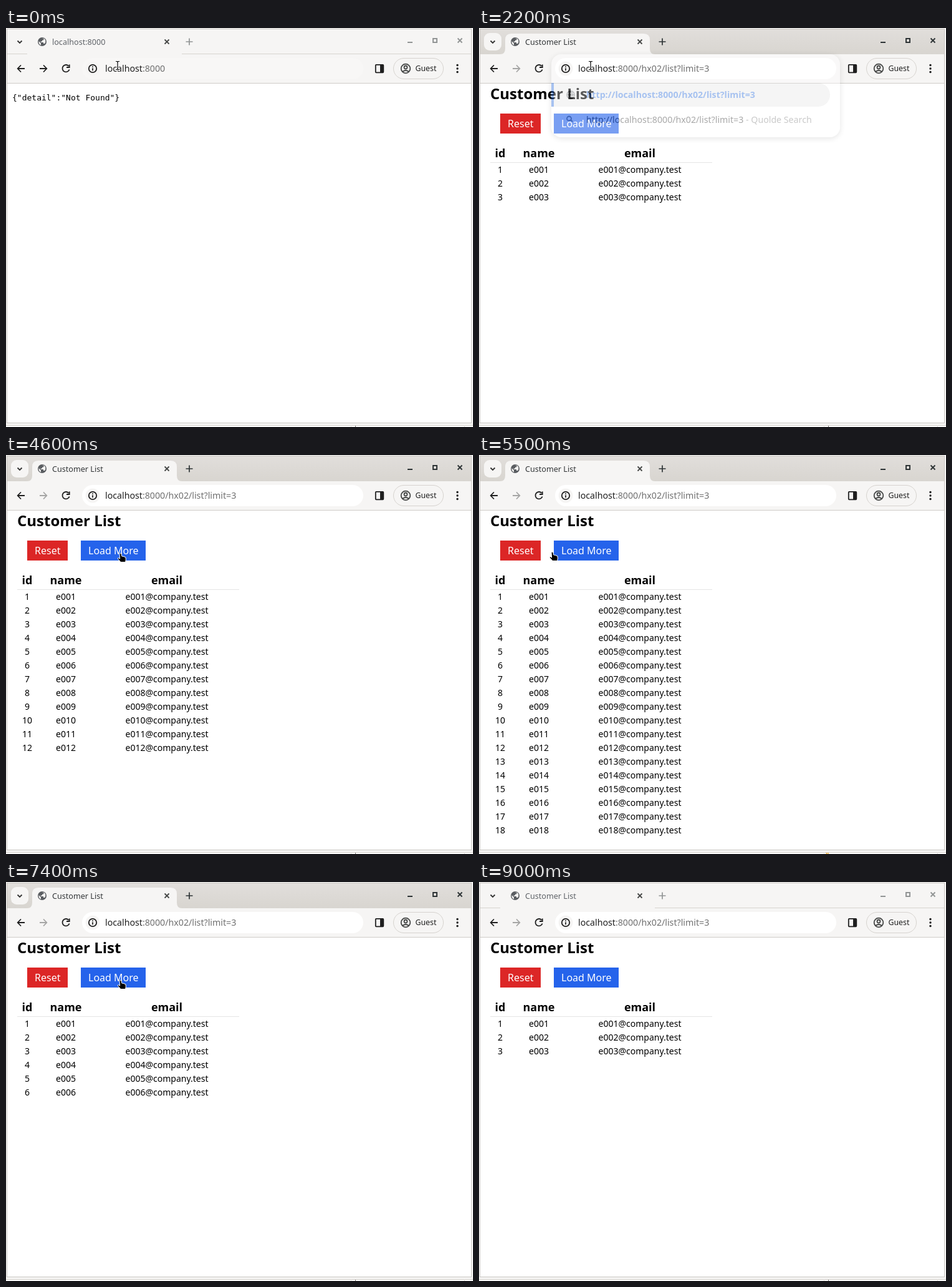
Write an HTML page that moves like this. It is 749 px wide and 639 px high and loops after 9.3 s.

```html
<!DOCTYPE html>
<html lang="en">
<head>
<meta charset="utf-8">
<title>Customer List</title>
<style>
html, body { margin: 0; width: 100%; height: 100%; overflow: hidden; background: #f9f8f7; }
svg { display: block; width: 749px; height: 639px; }
text { font-family: "Noto Sans", sans-serif; white-space: pre; }
.mono { font: 13px "DejaVu Sans Mono", monospace; }
.url { font-size: 14.2px; }
.tab { font-size: 12.6px; }
.small { font-size: 12.3px; }
.btn { font-size: 16px; fill: #fff; }
.head { font-size: 18px; font-weight: 700; text-anchor: middle; }
.cell { font-size: 14px; text-anchor: middle; }
.line { fill: none; stroke-width: 1.8; }
#card { filter: drop-shadow(0 2px 5px rgba(0,0,0,.28)); }
#cursor path { stroke-linejoin: round; }
</style>
</head>
<body>
<svg viewBox="0 0 749 639" xmlns="http://www.w3.org/2000/svg">
  <defs>
    <linearGradient id="strip" x1="0" y1="0" x2="0" y2="1">
      <stop offset="0" stop-color="#e1dedb"/><stop offset="1" stop-color="#d8d5d0"/>
    </linearGradient>
  </defs>
  <rect width="749" height="639" fill="#f9f8f7"/>
  <rect y="633" width="749" height="3" fill="#f6f5f4"/>
  <rect y="636" width="749" height="1" fill="#d3cfca"/>
  <rect y="637" width="749" height="2" fill="#fff"/>
  <path d="M553.5 636v3M735.5 636v3" stroke="#e4e1dd"/>
  <path d="M560.5 637v2" stroke="#77736f"/>
  <path id="mark" d="M556.5 637l1 2M558.5 637v2M560.5 637v2" stroke="#e9a520"/>
  <rect x="1.5" y="1.5" width="745" height="631" fill="#fff" stroke="#c8c5c1"/>

  <g id="json"><text class="mono" x="10" y="116">{"detail":"Not Found"}</text></g>
  <g id="list">
    <text x="18" y="114" font-size="24" font-weight="700">Customer List</text>
    <rect x="34" y="137" width="65" height="32" fill="#dc2626"/>
    <text class="btn" x="46" y="159">Reset</text>
    <rect x="120" y="137" width="104" height="32" fill="#2563eb"/>
    <text class="btn" x="132" y="159">Load More</text>
    <text class="head" x="34" y="207">id</text>
    <text class="head" x="96" y="207">name</text>
    <text class="head" x="258" y="207">email</text>
    <rect x="18" y="215" width="356" height="1" fill="#e5e5e5"/>
    <g id="rows"></g>
  </g>

  <!-- tab strip -->
  <rect x="2" y="2" width="744" height="86" fill="#f6f5f4"/>
  <g id="active">
    <rect x="2" y="2" width="744" height="40" fill="url(#strip)"/>
    <rect x="8" y="8" width="28" height="28" rx="9" fill="#f6f5f4"/>
    <path d="M34 42Q42 42 42 33V19Q42 9 52 9H264Q274 9 274 19V33Q274 42 282 42Z" fill="#f6f5f4"/>
  </g>
  <path id="idle" d="M2 41.5H34M282 41.5H746" stroke="#d6d3cf"/>
  <rect x="2" y="88" width="744" height="1" fill="#cfccc8"/>
  <path d="M18.5 20.5L22 24L25.5 20.5" class="line" stroke="#333" stroke-width="1.5"/>
  <circle cx="58" cy="22" r="7" fill="#5a5d61"/>
  <path d="M52.5 21L56 24.5V27.6Q52 26 52.5 21ZM57 16.5H61L60 19.5H58V21.5H55.5L56 23H60V25H62Q64 23 63.2 19.5L61.5 17Z" fill="#f6f5f4"/>
  <text id="title" class="tab" x="74" y="27"></text>
  <path d="M254.5 18.5l7 7m0-7l-7 7" class="line" stroke="#454746" stroke-width="1.5"/>
  <g id="winIcons" class="line">
    <path d="M288.5 22h11M294 16.500v11" stroke-width="1.7"/>
    <path d="M644 23h8" stroke-width="2"/>
    <rect x="685" y="17" width="6" height="6" stroke-width="2"/>
    <path d="M724.500 16.500l7 7m0-7l-7 7" stroke-width="1.9"/>
  </g>

  <!-- toolbar -->
  <path d="M30 65H19M24 59.500L18.700 65L24 70.500" class="line" stroke="#1f1f1f"/>
  <path id="forward" d="M54 65H65M60 59.500L65.300 65L60 70.500" class="line"/>
  <path d="M100.500 61A5.700 5.700 0 1 0 101.600 66.500M101.700 58.500V63H97" class="line" stroke="#1f1f1f"/>
  <rect x="592.800" y="58.800" width="12.500" height="12.500" rx="1" class="line" stroke="#1f1f1f" stroke-width="1.6"/>
  <rect x="600" y="59" width="6" height="12" fill="#1f1f1f"/>
  <rect x="621.500" y="48.500" width="80" height="33" rx="16.500" fill="none" stroke="#d6d3cf"/>
  <g class="line" stroke="#454746" stroke-width="1.500">
    <circle cx="641" cy="65" r="7.300"/><circle cx="641" cy="63" r="2.500"/>
    <path d="M636 70Q641 66 646 70"/>
  </g>
  <text class="small" x="656.500" y="69" fill="#1f1f1f">Guest</text>
  <g fill="#1f1f1f"><circle cx="724" cy="59.500" r="1.700"/><circle cx="724" cy="65" r="1.700"/><circle cx="724" cy="70.500" r="1.700"/></g>

  <!-- suggestions -->
  <g id="popup">
    <rect id="card" x="116" y="42" width="463" height="133" rx="16" fill="#fff"/>
    <path d="M116 88H544A19 19 0 0 1 544 126H116Z" fill="#e6e6e6"/>
    <rect x="116" y="88" width="4" height="38" fill="#1a62d8"/>
    <circle cx="147" cy="107" r="6" class="line" stroke="#5f6368" stroke-width="1.500"/>
    <path d="M141 107H153M147 101Q142 107 147 113Q152 107 147 101" class="line" stroke="#5f6368" stroke-width="1"/>
    <text class="url" x="172" y="112" fill="#1a62d8" font-weight="700">http://localhost:8000/hx02/list?limit=3</text>
    <path d="M150 150L146.800 146.800M148 145A3.500 3.500 0 1 0 141 145A3.500 3.500 0 1 0 148 145" class="line" stroke="#5f6368"/>
    <text class="url" x="172" y="152" fill="#1f1f1f">http://localhost:8000/hx02/list?limit=3<tspan fill="#757575"> - Quolde Search</tspan></text>
  </g>

  <!-- address bar -->
  <rect id="pill" x="122" y="48" width="451" height="34" rx="17" stroke="#0b57d0"/>
  <circle cx="139" cy="65" r="11.500" fill="#f6f5f4"/>
  <circle cx="139" cy="65" r="6.200" class="line" stroke="#1f1f1f" stroke-width="1.700"/>
  <path d="M139 64.300v4M139 61.300v1.700" stroke="#1f1f1f" stroke-width="1.700"/>
  <rect id="select" x="159" y="55" width="96" height="20" fill="#3584e4"/>
  <text class="url" x="159" y="70"><tspan id="host"></tspan><tspan id="path"></tspan></text>
  <g id="grid" class="line" stroke="#454746" stroke-width="1.600">
    <rect x="542.500" y="58.500" width="5" height="5"/><rect x="550.500" y="58.500" width="5" height="5"/>
    <rect x="542.500" y="66.500" width="5" height="5"/>
    <path d="M550 67h2m2 0h2M552 69h2M550 71h2m2 0h2" stroke-width="2"/>
  </g>

  <g id="cursor">
    <g id="beam" fill="none">
      <path d="M-3-6.500H-1Q0-6 0-5Q0-6 1-6.500H3M0-5V5M-3 6.500H-1Q0 6 0 5Q0 6 1 6.500H3" stroke="#fff" stroke-width="3"/>
      <path d="M-3-6.500H-1Q0-6 0-5Q0-6 1-6.500H3M0-5V5M-3 6.500H-1Q0 6 0 5Q0 6 1 6.500H3" stroke="#000" stroke-width="1.200"/>
    </g>
    <path id="hand" d="M-1 1.200Q.5-.6 2 1.200L2.600 5L6 5.600L9 7L9.300 11L8.500 14.500H1L-3.500 9.500Q-4.300 7.500-2.200 7.800L-.4 9.300Z" fill="#000" stroke="#fff"/>
    <path id="arrow" d="M0 0V15L3.600 11.700L6 17L8.400 16L6 10.800H11Z" fill="#000" stroke="#fff"/>
  </g>
</svg>
<script>
const LOOP = 9300, STEP = 100;
const $ = id => document.getElementById(id);
const show = (id, on) => { $(id).style.display = on ? "" : "none"; };

// [time, rows shown]
const counts = [[0, 0], [2100, 3], [4100, 6], [4400, 9], [4600, 12], [4800, 15], [5300, 18],
  [6600, 3], [7400, 6], [7700, 9], [7800, 12], [8400, 3]];
// [time, x, y]
const moves = [[0, 179, 60], [2800, 179, 60], [3300, 192, 153], [3400, 192, 153], [3700, 191, 159],
  [4000, 183, 157], [5400, 183, 157], [5500, 117, 155], [5800, 61, 152], [6200, 68, 157],
  [6700, 68, 157], [6950, 130, 164], [7200, 183, 157], [7800, 183, 157], [8200, 68, 157],
  [8400, 68, 157], [8800, 110, -20], [LOOP, 110, -20]];
// [time, opacity]
const fades = [[0, 0], [1500, 0], [1600, .35], [1700, .8], [1800, 1], [2000, 1], [2100, .8],
  [2200, .38], [2300, 0], [LOOP, 0]];

function at(keys, t) {
  let i = 0;
  while (i < keys.length - 2 && keys[i + 1][0] <= t) i++;
  const a = keys[i], b = keys[i + 1];
  const u = Math.min(1, (t - a[0]) / (b[0] - a[0])), e = u * u * (3 - 2 * u);
  return a.slice(1).map((v, k) => v + (b[k + 1] - v) * e);
}

const rows = Array.from({ length: 18 }, (_, i) => {
  const g = document.createElementNS("http://www.w3.org/2000/svg", "g");
  const name = "e" + String(i + 1).padStart(3, "0");
  const cell = (x, s) => `<text class="cell" x="${x}" y="${232 + 22 * i}">${s}</text>`;
  g.innerHTML = cell(34, i + 1) + cell(96, name) + cell(258, name + "@company.test");
  $("rows").append(g);
  return g;
});

function drawCursor(t) {
  const [x, y] = at(moves, t);
  const beam = y < 82 && t < 4000;
  const hx = x + 4;
  const hand = y > 136 && y < 169 && ((hx > 34 && hx < 103) || (hx > 119 && hx < 228));
  $("cursor").setAttribute("transform", `translate(${Math.round(x)} ${Math.round(y)})`);
  show("beam", beam);
  show("hand", hand);
  show("arrow", !beam && !hand);
}

function draw(t) {
  const active = t >= 800 && t < 9000;
  const focus = t >= 900 && t < 1600;
  const typed = t >= 1600, loaded = t >= 2100, entry = typed && !loaded;
  show("active", active);
  show("idle", !active);
  $("winIcons").setAttribute("stroke", active ? "#2e3436" : "#929595");
  $("title").textContent = loaded ? "Customer List" : "localhost:8000";
  $("title").setAttribute("fill", active ? "#333638" : "#5f6368");
  $("forward").setAttribute("stroke", loaded ? "#a5a5a4" : "#1f1f1f");

  show("json", !loaded);
  show("list", loaded);
  const n = counts.filter(c => c[0] <= t).pop()[1];
  rows.forEach((g, i) => { g.style.display = i < n ? "" : "none"; });

  const alpha = at(fades, t)[0];
  show("popup", alpha > 0);
  $("popup").setAttribute("opacity", alpha);
  $("pill").setAttribute("fill", t < 800 ? "#f8f7f6" : "#fff");
  $("pill").setAttribute("stroke-width", focus ? 2 : 0);
  show("select", focus);
  show("grid", t >= 1000 && t < 1600);
  $("host").textContent = (entry ? "http://" : "") + "localhost";
  $("host").setAttribute("fill", focus ? "#fff" : "#1f1f1f");
  $("path").textContent = ":8000" + (typed ? "/hx02/list?limit=3" : "");
  $("path").setAttribute("fill", focus ? "#fff" : entry ? "#1f1f1f" : "#707070");

  show("mark", t < 6000 && Math.floor((t + 1100) / 1000) % 2 === 0 && t >= 900);
  drawCursor(t);
}

function tick() {
  const t = performance.now() % LOOP;
  draw(Math.floor(t / STEP) * STEP);
  requestAnimationFrame(tick);
}
tick();
</script>
</body>
</html>
```
